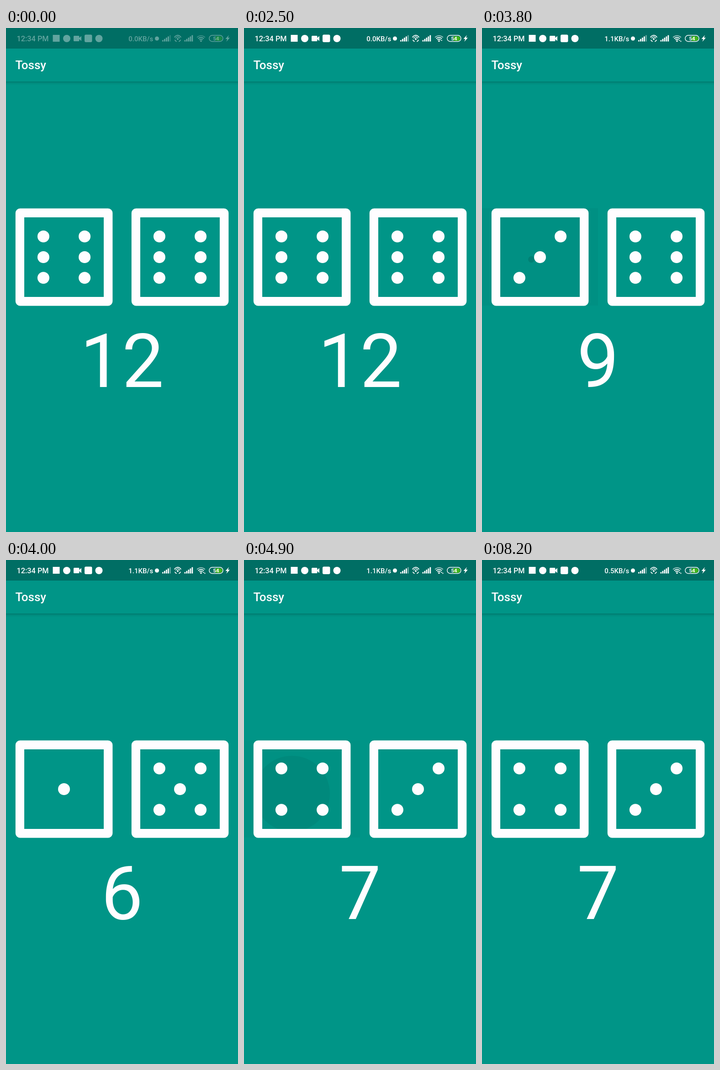
Write an HTML page with a canvas that moves like this. It is 508x1102 px and loops after 8300 ms.

```html
<!DOCTYPE html>
<html lang="en">
<head>
<meta charset="utf-8">
<title>Dice roller</title>
<style>
  html, body { margin: 0; width: 100%; height: 100%; overflow: hidden; background: #009587; }
  canvas { display: block; width: 508px; height: 1102px; }
</style>
</head>
<body>
<canvas id="stage" width="508" height="1102"></canvas>
<script>
const ctx = document.getElementById('stage').getContext('2d');
const LOOP = 8300, STEP = 100;
const WHITE = '#fffdff', TEAL = '#009587', BAR = '#006e64';

// Each entry holds from its time until the next one.
const rolls = [[0, 6, 6], [2900, 3, 6], [3900, 1, 5], [4400, 6, 2], [4800, 4, 3]];
const rates = [[0, '0.0'], [3500, '1.1'], [8100, '0.5']];
const taps = [
  { start: 2800, length: 700, x: 111, y: 503 },
  { start: 3800, length: 200, x: 108, y: 506 },
  { start: 4300, length: 400, x: 106, y: 509 },
  { start: 4700, length: 400, x: 105, y: 511 },
  { start: 5400, length: 400, x: 105, y: 511 }
];

const latest = (list, t) => list.filter(item => item[0] <= t).pop();
const clamp = v => Math.max(0, Math.min(1, v));

function rect(x, y, w, h, color, radius = 0) {
  ctx.fillStyle = color;
  ctx.beginPath();
  ctx.roundRect(x, y, w, h, radius);
  ctx.fill();
}

function dot(x, y, r, color = WHITE) {
  ctx.fillStyle = color;
  ctx.beginPath();
  ctx.arc(x, y, r, 0, Math.PI * 2);
  ctx.fill();
}

function poly(points, color = WHITE) {
  ctx.fillStyle = color;
  ctx.beginPath();
  points.forEach(([x, y]) => ctx.lineTo(x, y));
  ctx.fill();
}

function arc(x, y, r, from, to, width) {
  ctx.strokeStyle = WHITE;
  ctx.lineWidth = width;
  ctx.beginPath();
  ctx.arc(x, y, r, from * Math.PI / 180, to * Math.PI / 180);
  ctx.stroke();
}

function text(str, x, y, size, weight = 400, align = 'left') {
  ctx.font = `${weight} ${size}px Roboto, sans-serif`;
  ctx.textAlign = align;
  ctx.fillStyle = WHITE;
  ctx.fillText(str, x, y);
}

function faded(alpha, draw) {
  ctx.save();
  ctx.globalAlpha *= alpha;
  draw();
  ctx.restore();
}

function signal(x, lastAlpha) {
  for (let i = 0; i < 5; i++) {
    const h = 3 + i * 2.7;
    faded(i === 4 ? lastAlpha : 1, () => rect(x + i * 4, 29.5 - h, 2.8, h, WHITE));
  }
}

function hotspot(x, y) {
  arc(x, y + 1, 8, 205, 335, 1.8);
  arc(x, y + 1, 4.6, 195, 345, 1.6);
  dot(x, y + 1, 2);
  arc(x, y, 7, 25, 70, 1.8);
  arc(x, y, 7, 110, 155, 1.8);
}

function wifi(x, y, t) {
  faded(0.6, () => arc(x, y, 12.5, 225, 315, 2));
  arc(x, y, 8.7, 225, 315, 2);
  arc(x, y, 5, 225, 315, 2);
  dot(x, y - 1, 1.8);
  if (t >= 2500) poly([[431, 28], [432.7, 25.5], [434.4, 28]]);
  if (t >= 2600) poly([[433.7, 28.2], [437.1, 28.2], [435.4, 30.8]]);
}

function battery() {
  rect(459, 18, 14.5, 10, '#42b51c', [0, 5, 5, 0]);
  ctx.strokeStyle = WHITE;
  ctx.lineWidth = 1.4;
  ctx.beginPath();
  ctx.roundRect(445, 16, 30, 13.5, 6.5);
  ctx.stroke();
  text('54', 460, 27, 11.5, 700, 'center');
  poly([[488, 15.5], [480.5, 24], [484.5, 24], [482.5, 30], [490, 21.3], [486, 21.3]]);
}

function statusBar(t) {
  rect(0, 0, 508, 45, BAR);
  const shown = clamp((Math.floor(t / STEP) - 2) / 6);
  faded(0.38 + 0.62 * shown, () => {
    text('12:34 PM', 23.5, 28.7, 16.3, 500);
    rect(102.5, 15, 15, 15, WHITE);
    dot(133, 23, 8);
    rect(148, 17, 12.5, 12, WHITE, 1.5);
    poly([[160, 22], [165, 17.5], [165, 28.5], [160, 24]]);
    rect(172, 14.5, 16.5, 16.5, WHITE, 3);
    dot(203.5, 23, 8);
    text(latest(rates, t)[1] + 'KB/s', 268.3, 28.5, 15, 500);
    dot(330.5, 23, 4.5);
    signal(342, 0.4);
    hotspot(376, 23);
    signal(390.5, 1);
    wifi(427, 29.5, t);
    battery();
  });
}

function appBar() {
  const shade = ctx.createLinearGradient(0, 117, 0, 125);
  shade.addColorStop(0, 'rgba(0,0,0,.2)');
  shade.addColorStop(0.4, 'rgba(0,0,0,.07)');
  shade.addColorStop(1, 'rgba(0,0,0,0)');
  rect(0, 117, 508, 8, shade);
  text('Tossy', 20.5, 90, 26, 500);
}

function ripple({ start, length, x, y }, t) {
  const age = t - start;
  if (age < 0 || age >= length) return;
  const fade = clamp((length - age) / Math.min(length, 500));
  ctx.save();
  ctx.beginPath();
  ctx.rect(0, 394, 254, 213);
  ctx.clip();
  rect(0, 394, 254, 213, `rgba(0,0,0,${Math.min(0.03 + age / 5000, 0.055) * fade})`);
  dot(x, y, Math.min(7 + age * 0.38, 130), `rgba(0,0,0,${0.11 * fade})`);
  ctx.restore();
}

function die(x, value) {
  ctx.fillStyle = WHITE;
  ctx.beginPath();
  ctx.roundRect(x + 20.8, 394.5, 212.6, 213, 10);
  ctx.rect(x + 40, 414, 174, 174);
  ctx.fill('evenodd');
  const pip = (col, row) => dot(x + 127 + col * 45.1, 501 + row * 45.2, 13);
  const pair = (col, row) => { pip(col, row); pip(-col, -row); };
  if (value % 2) pip(0, 0);
  if (value > 1) pair(1, -1);
  if (value > 3) pair(1, 1);
  if (value === 6) pair(1, 0);
}

function draw(t) {
  rect(0, 0, 508, 1102, TEAL);
  statusBar(t);
  appBar();
  taps.forEach(tap => ripple(tap, t));
  const [, left, right] = latest(rolls, t);
  die(0, left);
  die(254, right);
  text(left + right, 254, 785, 163, 400, 'center');
}

const begin = performance.now();
function tick() {
  const t = (performance.now() - begin) % LOOP;
  draw(Math.floor(t / STEP) * STEP);
  requestAnimationFrame(tick);
}
tick();
</script>
</body>
</html>
```
